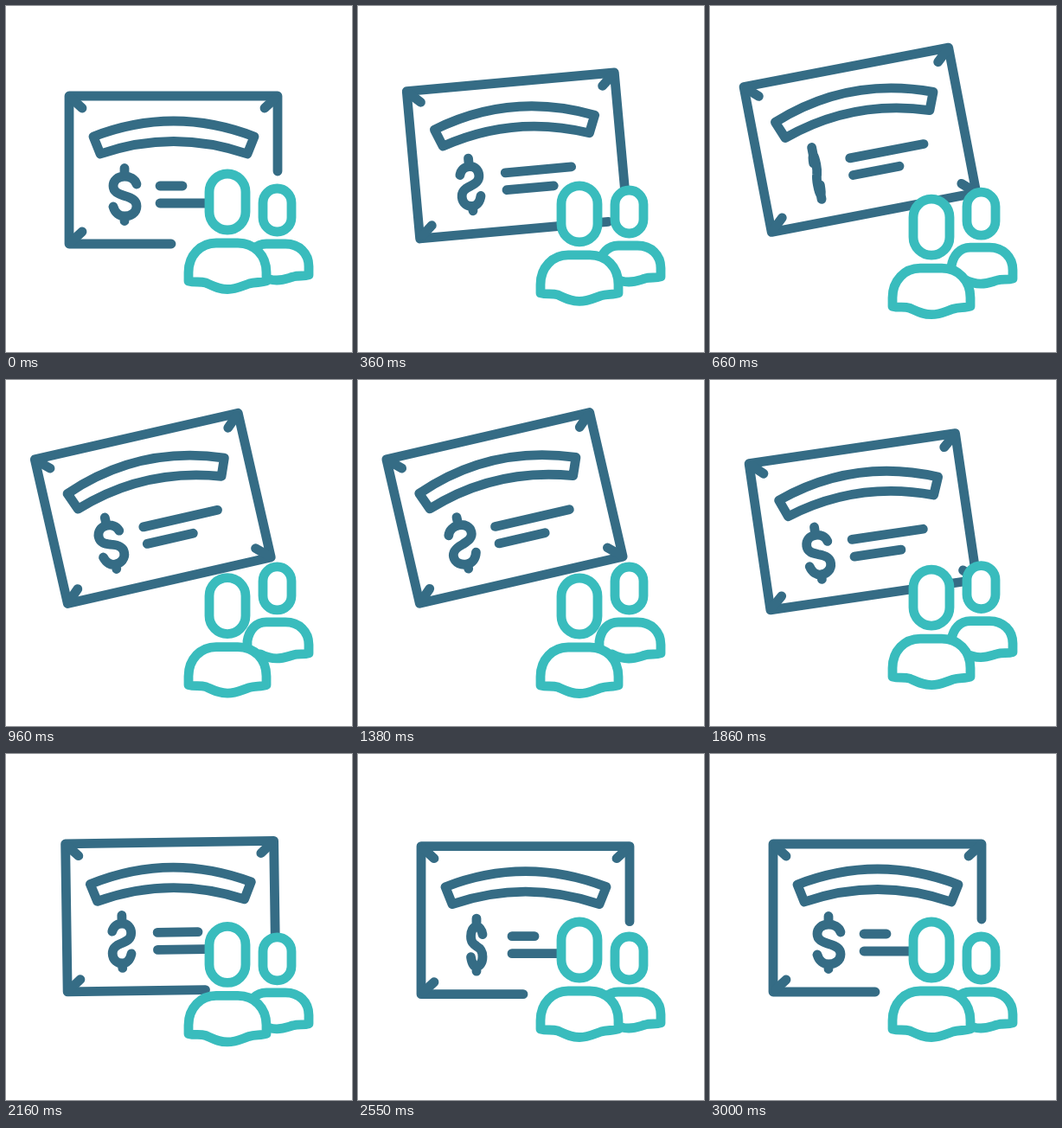
These frames come from a looping animation (400x400 px, 5.03 s). An HTML page with a canvas:

```html
<!DOCTYPE html>
<html lang="en">
<head>
<meta charset="utf-8">
<title>Certificate and people</title>
<style>
  html, body { margin: 0; width: 100%; height: 100%; overflow: hidden; background: #fff; }
  canvas { display: block; width: 400px; height: 400px; }
</style>
</head>
<body>
<canvas id="stage"></canvas>
<script>
const LOOP = 5030, STEP = 30, PEAK = 1260, REST = 3000;
const NAVY = '#356c85', TEAL = '#39bcbd';
const CENTER = { x: 193.5, y: 189.5 };

// Rises from 0 to 1 until PEAK, then falls back to 0 within `fall` ms.
function phase(t, fall) {
  const u = t < PEAK ? t / PEAK : Math.max(0, 1 - (t - PEAK) / fall);
  return Math.sin(u * Math.PI / 2);
}

const swing = (t, fall) => (1 - Math.cos(Math.PI * phase(t, fall))) / 2;

// The card sinks a little on landing and then settles.
function sag(t) {
  const u = (t - 2250) / (REST - 2250);
  return u > 0 && u < 1 ? 2.8 * Math.sin(Math.PI * u) : 0;
}

function pose(t) {
  return {
    angle: -13 * swing(t, 1005) * Math.PI / 180,
    x: -24 * swing(t, 1060),
    y: -41.6 * swing(t, 985) + sag(t),
    reveal: 1 - (1 - phase(t, 980)) ** 3,
    drop: 35 * swing(t, 1080),
    flip: Math.cos(6 * Math.PI * Math.min(1, t / 2700))
  };
}

const canvas = document.getElementById('stage');
const ratio = window.devicePixelRatio || 1;
canvas.width = canvas.height = 400 * ratio;
const ctx = canvas.getContext('2d');

function polyline(...points) {
  const path = new Path2D();
  points.forEach(([x, y], i) => i ? path.lineTo(x, y) : path.moveTo(x, y));
  return path;
}

function capsule(x, y, w, h) {
  const r = w / 2, path = new Path2D();
  path.arc(x + r, y + r, r, Math.PI, 0);
  path.arc(x + r, y + h - r, r, 0, Math.PI);
  path.closePath();
  return path;
}

const banner = new Path2D('M101 151 Q193.5 115 287 151 L279 171 Q193.5 142 109 171 Z');
const dollar = new Path2D(
  'M14 -12 C12 -18 6 -21 0 -21 C-8 -21 -13 -16 -13 -10 C-13 -3 -7 -1 0 1.5 ' +
  'C9 4 14 7 14 13.5 C14 21 7 25 0 25 C-6 25 -11 21 -13 14 M0 -30.5 V-21 M0 25 V30.5');

const frontHead = capsule(235, 194, 42, 65);
const frontBody = new Path2D(
  'M211 318 V308 C211 288 225 274 243 274 H268 C287 274 301 288 301 308 V318 ' +
  'C295 320 288 319 281 321 C272 324 266 327.5 256 327.5 C246 327.5 240 324 231 320 C224 318 218 320 211 318 Z');
const backHead = capsule(297, 211, 33, 50);
const backBody = new Path2D(
  'M279 297 C281 284 289 275 301 275 H323 C339 275 350 286 350 301 V311 ' +
  'C344 313 338 311 332 313 C325 315 321 317 313 317 C305 317 300 315 294 312 H279 Z');

// Short diagonal stroke from a corner towards the middle of the card.
function drawTick(x, y, length = 1) {
  const dx = Math.sign(CENTER.x - x), dy = Math.sign(CENTER.y - y);
  ctx.stroke(polyline([x, y], [x + 12 * dx * length, y + 11 * dy * length]));
}

// Only the outline is squashed, so the line weight stays constant.
function drawDollar(flip) {
  const path = new Path2D();
  path.addPath(dollar, new DOMMatrix().translate(137, 218).scale(flip, 1));
  ctx.stroke(path);
}

function drawCard({ angle, x, y, reveal, flip }) {
  ctx.save();
  ctx.translate(CENTER.x + x, CENTER.y + y);
  ctx.rotate(angle);
  ctx.translate(-CENTER.x, -CENTER.y);
  ctx.strokeStyle = NAVY;
  ctx.stroke(polyline([314, 191 + 84 * reveal], [314, 104], [73, 104], [73, 275], [191 + 123 * reveal, 275]));
  drawTick(76, 107);
  drawTick(311, 107);
  drawTick(76, 272);
  if (reveal > .5) drawTick(311, 272, reveal);
  ctx.stroke(banner);
  ctx.stroke(polyline([178, 208], [204 + 62 * reveal, 208]));
  ctx.stroke(polyline([178, 228], [232.5, 228]));
  drawDollar(flip);
  ctx.restore();
}

function drawPerson(shapes, dy) {
  ctx.save();
  ctx.translate(0, dy);
  ctx.fillStyle = '#fff';
  ctx.strokeStyle = TEAL;
  for (const shape of shapes) {
    ctx.fill(shape);
    ctx.stroke(shape);
  }
  ctx.restore();
}

function draw(t) {
  const now = pose(t);
  ctx.setTransform(ratio, 0, 0, ratio, 0, 0);
  ctx.fillStyle = '#fff';
  ctx.fillRect(0, 0, 400, 400);
  ctx.lineWidth = 10.8;
  ctx.lineCap = ctx.lineJoin = 'round';
  drawCard(now);
  drawPerson([backBody, backHead], now.drop / 7);
  drawPerson([frontBody, frontHead], now.drop);
}

const start = performance.now();
function tick() {
  const t = Math.max(0, performance.now() - start) % LOOP;
  draw(Math.floor(t / STEP) * STEP);
  requestAnimationFrame(tick);
}
tick();
</script>
</body>
</html>
```
